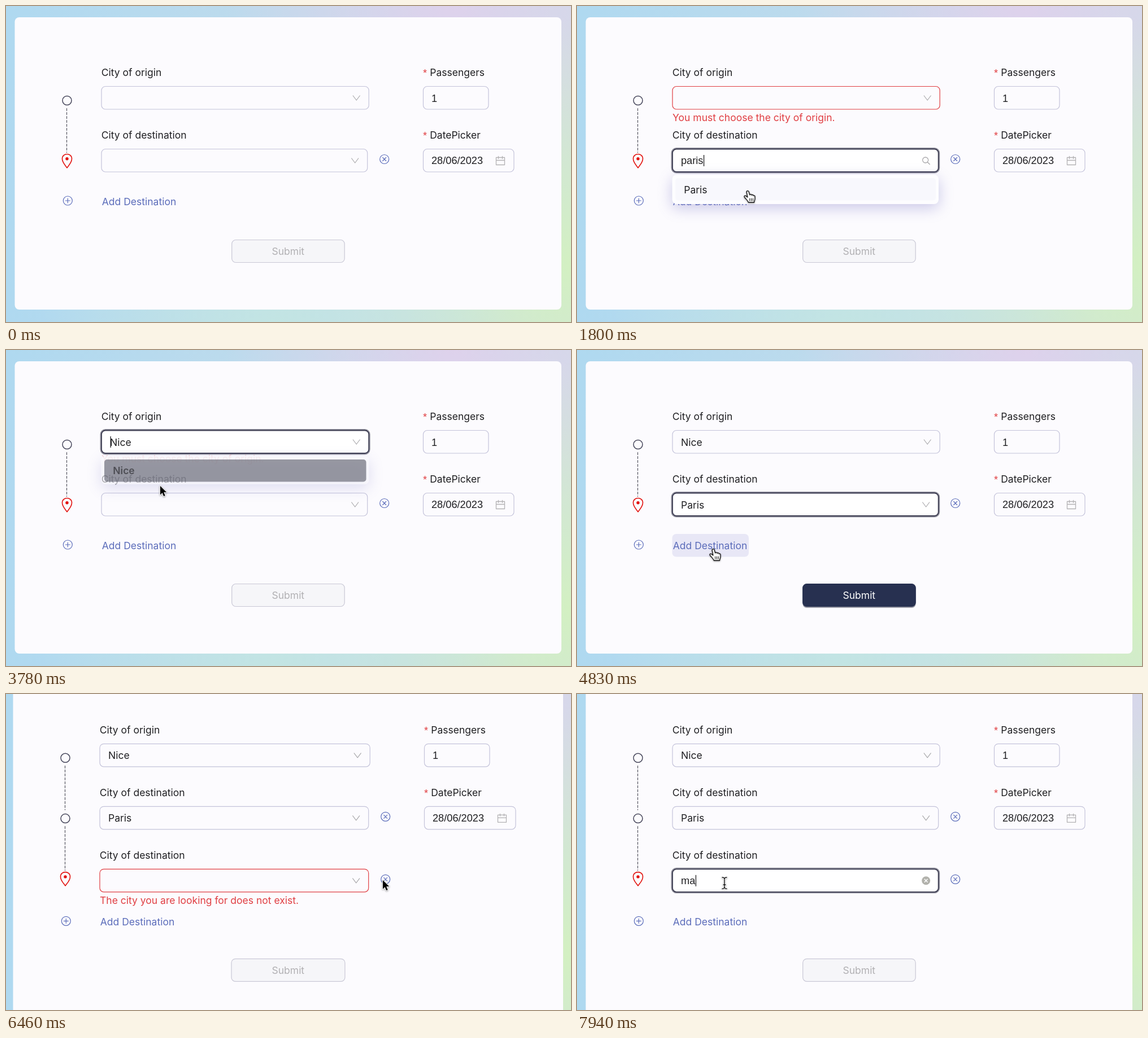
An HTML page with a canvas for the animation above (8000 ms loop, 1000 by 560 pixels).

```html
<!DOCTYPE html>
<html lang="en">
<head>
<meta charset="utf-8">
<title>Trip form</title>
<style>
  html, body { margin: 0; width: 100%; height: 100%; overflow: hidden; }
  canvas { display: block; }
</style>
</head>
<body>
<canvas id="stage" width="1000" height="560"></canvas>
<script>
const ctx = document.getElementById('stage').getContext('2d');
const LOOP = 8000, FADE = 200, ROW = 111;
const UI = '17.5px Inter, sans-serif', INPUT = '18.2px "Liberation Sans", Arial, sans-serif';
const INK = '#1f1f22', BORDER = '#c4c3da', CARD = '#fcfbfe';
const RED = '#e03e42', BLUE = '#5b6cba', GREY = '#b3b2b4';

// Form state changes, applied in order of time
const events = [
  [640, { focus: 1, edit: true }],
  [700, { originError: 1 }],
  ...typing(950, 'paris', 120),
  [1900, { focus: -1, edit: false, typed: '' }],
  [2350, { focus: 0, edit: true }],
  ...typing(2600, 'nice', 140),
  [3700, { edit: false, typed: '', origin: 'Nice', originError: 0 }],
  [3950, { focus: 1, edit: true }],
  ...typing(4080, 'par', 100),
  [4560, { edit: false, typed: '', first: 'Paris' }],
  [4900, { rows: 3, focus: -1 }],
  [5100, { focus: 2, edit: true }],
  ...typing(5340, '234', 150),
  [5920, { focus: -1, edit: false, typed: '', lastError: 1, wide: 1 }],
  [6570, { rows: 2, lastError: 0, wide: 0 }],
  [7160, { rows: 3 }],
  [7430, { focus: 2, edit: true }],
  ...typing(7760, 'ma', 150)
];

const popups = [
  { row: 1, text: 'Paris', from: 1150, to: 1900 },
  { row: 0, text: 'Nice', from: 2800, to: 3700 },
  { row: 1, text: 'Paris', from: 4200, to: 4560 }
];

// time, x, y, shape: a = arrow, h = hand, i = text beam, '' = hidden
const pointer = [
  [0, 330, 420, ''], [180, 330, 420, 'a'], [420, 318, 290, 'i'], [620, 310, 280, 'i'],
  [850, 308, 280, ''], [1500, 308, 280, 'i'], [1580, 306, 300, 'h'], [1720, 302, 328, 'h'],
  [1960, 302, 328, 'a'], [2200, 290, 180, 'i'], [2350, 288, 166, 'i'], [2520, 288, 166, ''],
  [3300, 288, 168, 'i'], [3400, 285, 188, 'h'], [3560, 270, 215, 'h'], [3715, 270, 218, 'a'],
  [3780, 272, 240, 'a'], [3860, 276, 262, 'i'], [3950, 280, 274, 'i'], [4060, 280, 276, ''],
  [4340, 280, 276, 'i'], [4400, 282, 300, 'h'], [4500, 284, 322, 'h'], [4570, 284, 322, 'h'],
  [4720, 241, 353, 'h'], [4905, 241, 353, 'i'], [5080, 255, 332, 'i'], [5300, 255, 332, ''],
  [5820, 255, 332, 'a'], [6330, 666, 329, 'a'], [6500, 666, 329, 'h'], [6590, 666, 329, 'a'],
  [7000, 250, 352, 'h'], [7165, 250, 352, 'i'], [7400, 261, 335, 'i'], [8000, 261, 335, 'i']
];

function typing(start, word, step) {
  return [...word].map((c, i) => [start + i * step, { typed: word.slice(0, i + 1) }]);
}

function stateAt(t) {
  const s = { rows: 2, focus: -1, edit: false, typed: '', origin: '', first: '',
              originError: 0, lastError: 0, wide: 0 };
  for (const [time, patch] of events) if (time <= t) Object.assign(s, patch);
  return s;
}

function pointerAt(t) {
  const i = pointer.findIndex((p, k) => k + 1 === pointer.length - 1 || pointer[k + 1][0] > t);
  const [t0, x0, y0, shape] = pointer[i], [t1, x1, y1] = pointer[i + 1];
  const u = Math.min(1, (t - t0) / (t1 - t0)), k = u * u * (3 - 2 * u);
  return { x: x0 + (x1 - x0) * k, y: y0 + (y1 - y0) * k, shape };
}

function popupAlpha(p, t) {
  const rise = (t - p.from) / FADE, fall = 1 - (t - p.to) / FADE;
  return Math.max(0, Math.min(1, rise, fall));
}

function text(str, x, y, color = INK, font = UI, align = 'left') {
  ctx.font = font;
  ctx.fillStyle = color;
  ctx.textAlign = align;
  ctx.fillText(str, x, y);
}

function box(x0, y0, x1, y1, r, fill, stroke, width = 1) {
  ctx.beginPath();
  ctx.roundRect(x0, y0, x1 - x0, y1 - y0, r);
  if (fill) { ctx.fillStyle = fill; ctx.fill(); }
  if (stroke) { ctx.strokeStyle = stroke; ctx.lineWidth = width; ctx.stroke(); }
}

function line(d, x, y, color, width = 1.2, fill) {
  ctx.save();
  ctx.translate(x, y);
  const path = new Path2D(d);
  ctx.strokeStyle = color;
  ctx.lineWidth = width;
  ctx.lineJoin = ctx.lineCap = 'round';
  if (fill) { ctx.fillStyle = fill; ctx.fill(path); }
  ctx.stroke(path);
  ctx.restore();
}

function circle(x, y, r, stroke, width, fill) {
  ctx.beginPath();
  ctx.arc(x, y, r, 0, 7);
  if (fill) { ctx.fillStyle = fill; ctx.fill(); }
  if (stroke) { ctx.strokeStyle = stroke; ctx.lineWidth = width; ctx.stroke(); }
}

function glow(x, y, r, rgb, alpha) {
  const g = ctx.createRadialGradient(x, y, 0, x, y, r);
  g.addColorStop(0, `rgba(${rgb},${alpha})`);
  g.addColorStop(1, `rgba(${rgb},0)`);
  ctx.fillStyle = g;
  ctx.fillRect(0, 0, 1000, 560);
}

function background() {
  const g = ctx.createLinearGradient(0, 0, 1000, 0);
  g.addColorStop(0, '#afd9f0');
  g.addColorStop(1, '#cfdde8');
  ctx.fillStyle = g;
  ctx.fillRect(0, 0, 1000, 560);
  glow(790, 0, 400, '223,209,236', 0.95);
  glow(1000, 460, 440, '211,240,194', 1);
  glow(480, 600, 420, '196,232,224', 0.8);
}

function timeline(rows, dx) {
  const x = 108 + dx, at = i => 167.5 + 107.3 * i;
  for (let i = 0; i < rows; i++) {
    if (i < rows - 1) {
      circle(x, at(i), 8, '#45455a', 1.5);
      ctx.setLineDash([4, 3]);
      line('M0 14V92', x - 0.5, at(i), '#55555f', 1.2);
      ctx.setLineDash([]);
    } else {
      const y = at(i) - 3.5;
      line('M0 15.5C-3 11-8.5 6-8.5-.5C-8.5-11.5 8.5-11.5 8.5-.5C8.5 6 3 11 0 15.5Z', x, y, '#e2130f', 1.6);
      circle(x, y - 0.5, 2.7, null, 0, '#e2130f');
    }
  }
}

function icon(kind, x, y) {
  if (kind === 'search') {
    circle(x - 1, y - 1, 5, '#aaa9ac', 1.3);
    line('M3 3L7 7', x - 0.5, y - 0.5, '#aaa9ac', 1.4);
  } else if (kind === 'clear') {
    circle(x, y, 7.5, null, 0, '#b2b2ac');
    line('M-2.5-2.5L2.5 2.5M2.5-2.5L-2.5 2.5', x, y, '#fff', 1.4);
  } else {
    line('M-6-4L0 4L6-4', x, y, '#aaa9ac', 1.2);
  }
}

function select(s, row, t) {
  const left = 169 + (s.wide ? -3 : 0), right = (row ? 639.7 : 642.2) + (s.wide ? 2 : 0);
  const top = 142.5 + ROW * row, bottom = top + 40.5, mid = top + 20.5;
  const focused = s.focus === row, editing = focused && s.edit;
  const error = row === 0 ? s.originError : row === 2 && s.lastError;
  const popup = popups.find(p => p.row === row && popupAlpha(p, t) > 0);

  text(row ? 'City of destination' : 'City of origin', left - 0.3, top - 18.5);
  if (focused) box(left, top, right, bottom, 7, null, '#92929e', 5);
  box(left, top, right, bottom, 7, focused ? '#fff' : CARD,
      error ? RED : focused ? '#3b3b50' : BORDER, focused ? 1.8 : 1.2);

  const value = row === 0 ? s.origin : row === 1 ? s.first : '';
  let caret = -1;
  if (editing) {
    text(s.typed, left + 15, mid + 6.3, INK, INPUT);
    caret = left + 16 + ctx.measureText(s.typed).width;
  } else {
    text(value, left + 15, mid + 6.6);
    if (focused && popup) caret = left + 16;
  }
  if (caret > 0) {
    ctx.fillStyle = INK;
    ctx.fillRect(caret - 0.5, mid - 10, 1.3, 20);
  }
  icon(!editing ? 'chevron' : s.typed && !popup ? 'clear' : 'search', right - 22, mid);

  if (row) {
    const x = 669.7 + (s.wide ? 2 : 0), y = mid - 2.5;
    circle(x, y, 8, BLUE, 1.2);
    line('M-3-3L3 3M3-3L-3 3', x, y, BLUE, 1.2);
  }
  if (row === 2 && error) text('The city you are looking for does not exist.', left, bottom + 21.3, RED);
  if (row === 0) {
    const shown = s.originError ? 1 : t > 3700 ? Math.max(0, 1 - (t - 3700) / 100) : 0;
    ctx.globalAlpha = shown;
    text('You must choose the city of origin.', left, bottom + 21.3 - 6 * (1 - shown), RED);
    ctx.globalAlpha = 1;
  }
}

function sideFields(s) {
  const x = 738.5 + (s.wide ? 2 : 0), end = 899 + (s.wide ? 3 : 0);
  ['Passengers', 'DatePicker'].forEach((label, i) => {
    text('*', x - 0.5, 125 + ROW * i, RED, INPUT);
    text(label, x + 11.7, 124 + ROW * i);
  });
  box(x, 142.5, x + 115.5, 183, 7, CARD, BORDER, 1.2);
  text('1', x + 14.5, 169.5, INK, INPUT);
  box(x, 253.5, end, 294, 7, CARD, BORDER, 1.2);
  text('28/06/2023', x + 14.5, 279.8, INK, INPUT);
  line('M-7.5-5.5H7.5V7.5H-7.5ZM-7.5-.5H7.5M-3.5-7.5V-3.5M3.5-7.5V-3.5', end - 24, 274, GREY, 1.3);
}

function actions(s, hover) {
  const dx = s.wide ? -3 : 0, extra = s.rows - 2;
  const y = 346 + 111.5 * extra;
  if (hover) box(168.5, y - 20, 304, y + 20.5, 7, '#e8e7f6');
  circle(109.3 + dx, y - 1, 8, BLUE, 1.2);
  line('M-4 0H4M0-4V4', 109.3 + dx, y - 1, BLUE, 1.2);
  text('Add Destination', 169.8 + dx, y + 6.8, BLUE);

  const top = 414.5 + 109 * extra, ready = s.rows === 2 && s.origin && s.first;
  const grow = s.wide ? 0.7 : 0;
  if (ready) box(399.5, top + 1, 599.5, top + 42.5, 7, '#9a9ba6');
  box(399.7 - grow, top, 599.2 + grow, top + 40, 7, ready ? '#273050' : '#f6f6f9', ready ? '#273050' : '#c9c8d6', 1.2);
  text('Submit', 499.3, top + 26.2, ready ? '#fff' : '#b1b0b3', UI, 'center');
}

function drawPopup(p, t) {
  const alpha = popupAlpha(p, t);
  if (!alpha) return;
  const y = 183 + ROW * p.row, right = p.row ? 640 : 642.5, picked = t >= p.to;
  ctx.globalAlpha = alpha;
  ctx.save();
  ctx.shadowColor = 'rgba(110,105,190,.36)';
  ctx.shadowBlur = 26;
  ctx.shadowOffsetY = 7;
  box(168.5, y + 5, right, y + 57 - (picked ? 2 : 0), 8, '#fdfdff');
  ctx.restore();
  box(174, y + 11, right - 5, y + 50.5, 5, picked ? '#575866' : '#f8f8fd');
  text(p.text, 189.3, y + (picked ? 37 : 38.3), INK, (picked ? '600 ' : '') + UI);
  ctx.globalAlpha = 1;
}

function drawPointer({ x, y, shape }) {
  if (!shape) return;
  ctx.save();
  ctx.translate(x, y);
  ctx.shadowColor = 'rgba(0,0,0,.3)';
  ctx.shadowBlur = 3;
  ctx.shadowOffsetY = 1;
  if (shape === 'a') {
    const arrow = 'M1 1V16.5L4.600 13L7.200 19L9.600 18L7.100 12H12Z';
    line(arrow, 0, 0, '#fff', 2.4, '#000');
    ctx.shadowColor = 'transparent';
    line(arrow, 0, 0, '#000', 0.2, '#000');
  } else if (shape === 'h') {
    ctx.scale(0.93, 0.93);
    line('M-2 2.2C-2.4-.6 1.4-1.4 2.4 1.4L4 7C5 5.6 7.4 5.8 7.8 7.6C9 6.4 11 7 11.3 8.8' +
         'C12.6 8 14 8.8 14 10.6V14.5C14 17 12.6 18 12.4 21.5H1.4C.8 18.5-3.5 15-6 11.6' +
         'C-7.4 9.4-4.8 7.6-2.6 9.6L-.2 11.6Z', 0, 0, '#111', 1.4, '#fff');
    ctx.shadowColor = 'transparent';
    line('M4 14V18.5M7 14V18.5M10 14V18.5', 0, 0, '#111', 1.1);
  } else {
    const beam = 'M-4-10Q0-10 0-7Q0-10 4-10M0-7V7M-4 10Q0 10 0 7Q0 10 4 10M-2 3H2';
    line(beam, 0, 0, '#fff', 3);
    ctx.shadowColor = 'transparent';
    line(beam, 0, 0, '#111', 1.4);
  }
  ctx.restore();
}

function draw(t) {
  const s = stateAt(t), p = pointerAt(t), lift = s.rows === 3 ? 54.2 : 0;
  const open = popups.some(q => popupAlpha(q, t) > 0.5);
  const addY = 346 + 111.5 * (s.rows - 2) - lift;
  const hover = p.shape === 'h' && !open && p.x > 168 && p.x < 304 && Math.abs(p.y - addY) < 20;

  background();
  const side = s.wide ? 3 : 0;
  box(15.5 - side, 20 - lift, 983 + side, 538 + lift, 8, CARD);
  ctx.save();
  ctx.translate(0, -lift);
  timeline(s.rows, -side);
  sideFields(s);
  actions(s, hover);
  for (let row = 0; row < s.rows; row++) select(s, row, t);
  popups.forEach(q => drawPopup(q, t));
  ctx.restore();
  drawPointer(p);
}

function tick() {
  draw(performance.now() % LOOP);
  requestAnimationFrame(tick);
}
tick();
</script>
</body>
</html>
```
